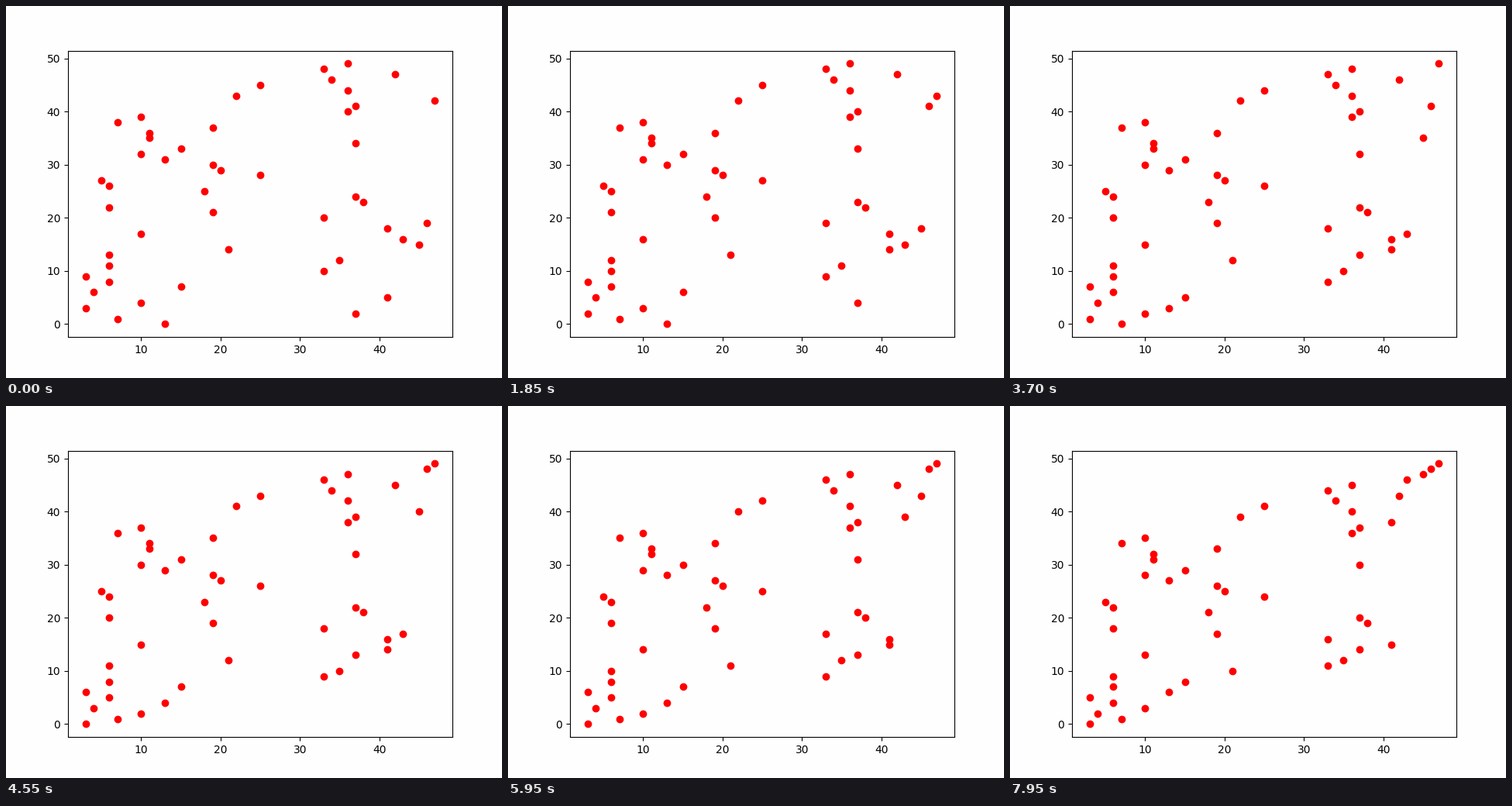
A matplotlib script that plays this animation: 640x480 px, repeating every 8 s.

```python
import matplotlib.pyplot as plt
from matplotlib.animation import FuncAnimation

FRAMES = 160
INTERVAL = 50
PAPER = "#fefefe"

# The unsorted input; every later position follows from the sort.
# Its first pass is already under way, carrying the value at FIRST_INDEX.
START = [13, 7, 37, 3, 10, 41, 4, 15, 6, 3, 33, 6, 35, 6, 21, 45, 43,
         10, 41, 46, 33, 19, 6, 38, 37, 18, 6, 5, 25, 20, 19, 13, 10, 15,
         37, 11, 11, 19, 7, 10, 36, 37, 47, 22, 36, 25, 34, 42, 33, 36]
FIRST_INDEX = 2


def bubble_states(values, first):
    """Yield the list at the start and after every swap of a bubble sort."""
    values = list(values)
    yield list(values)
    for end in range(len(values) - 1, 0, -1):
        for j in range(first, end):
            if values[j] > values[j + 1]:
                values[j], values[j + 1] = values[j + 1], values[j]
                yield list(values)
        first = 0


states = list(bubble_states(START, FIRST_INDEX))

fig, ax = plt.subplots(figsize=(6.4, 4.8), dpi=100, facecolor=PAPER)
ax.set_facecolor(PAPER)
points, = ax.plot(START, range(len(START)), "ro")


def update(frame):
    points.set_xdata(states[frame])
    return points,


anim = FuncAnimation(fig, update, frames=FRAMES, interval=INTERVAL,
                     repeat=True, repeat_delay=0)
plt.show()
```
